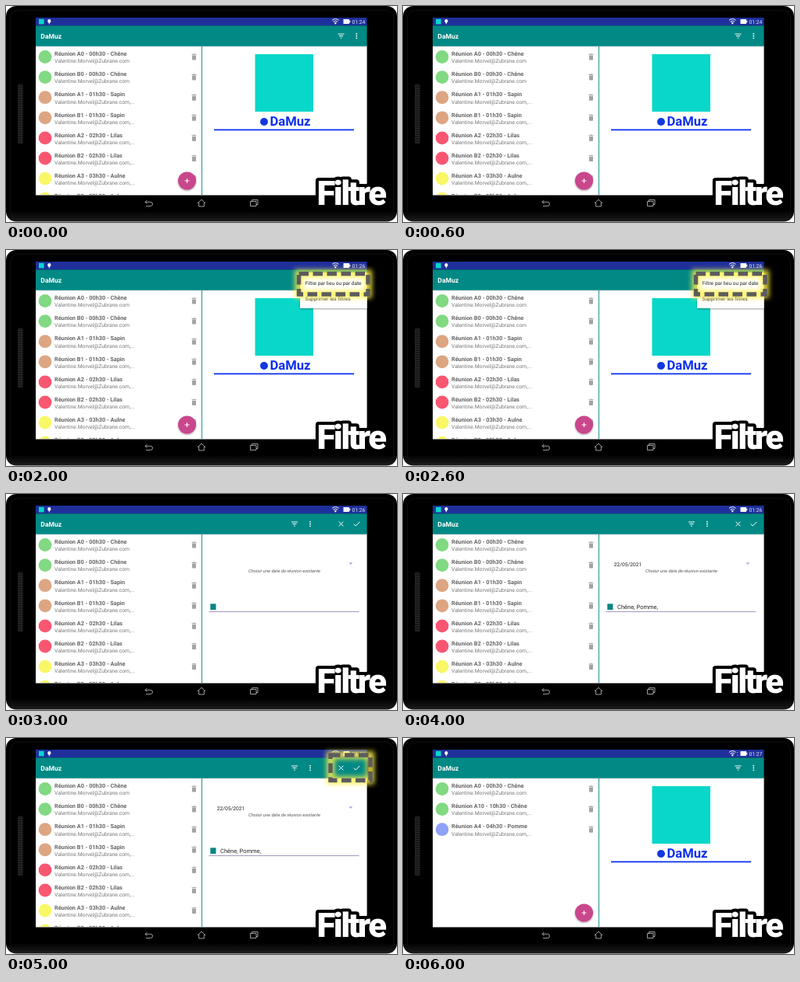
Write an HTML page that moves like this. It is 500 by 278 pixels and loops after 7 s.

```html
<!DOCTYPE html>
<html lang="fr">
<head>
<meta charset="utf-8">
<title>Filtre</title>
<style>
html, body { margin: 0; width: 100%; height: 100%; overflow: hidden; background: #fff; }
svg { display: block; width: 100vw; height: 100vh; }
text { font-family: Roboto, Arial, sans-serif; text-rendering: geometricPrecision; }
.bold { font-weight: 700; }
.line { fill: none; stroke: #fff; stroke-width: 1; }
.keys { fill: none; stroke: #c4c4c4; stroke-width: .8; }
.glow { fill: none; stroke: #fff04a; stroke-width: 10; opacity: .85; filter: url(#blur); }
.dash { fill: none; stroke: #5c5c5c; stroke-width: 5.5; stroke-dasharray: 12.5 5.5; }
.word {
  font: 900 43.5px "Roboto Condensed", Roboto, sans-serif;
  font-stretch: 75%; letter-spacing: -2.6px; text-anchor: middle; stroke-linejoin: round;
}

/* Hard cuts, one per second of the 7 s loop */
.home, .form, .menu, .pick, .filled, .apply, .all, .few, .t24, .t26 {
  animation: 7s step-end infinite;
}
.home { animation-name: home; }
.form { animation-name: form; }
.menu { animation-name: menu; }
.pick { animation-name: pick; }
.filled { animation-name: filled; }
.apply { animation-name: apply; }
.all { animation-name: all; }
.few { animation-name: few; }
.t24 { animation-name: t24; }
.t26 { animation-name: t26; }
@keyframes home { 0%, 85.7143% { visibility: visible } 42.8571% { visibility: hidden } }
@keyframes form { 0%, 85.7143% { visibility: hidden } 42.8571% { visibility: visible } }
@keyframes menu { 0%, 42.8571% { visibility: hidden } 14.2857% { visibility: visible } }
@keyframes pick { 0%, 42.8571% { visibility: hidden } 28.5714% { visibility: visible } }
@keyframes filled { 0%, 85.7143% { visibility: hidden } 57.1429% { visibility: visible } }
@keyframes apply { 0%, 85.7143% { visibility: hidden } 71.4286% { visibility: visible } }
@keyframes all { 0% { visibility: visible } 85.7143%, 100% { visibility: hidden } }
@keyframes few { 0% { visibility: hidden } 85.7143%, 100% { visibility: visible } }
@keyframes t24 { 0% { visibility: visible } 14.2857%, 100% { visibility: hidden } }
@keyframes t26 { 0%, 85.7143% { visibility: hidden } 14.2857% { visibility: visible } }
</style>
</head>
<body>
<svg viewBox="0 0 500 278" preserveAspectRatio="none">
  <defs>
    <clipPath id="content"><path d="M38 52H462V243H38z"/></clipPath>
    <filter id="blur" x="-30%" y="-60%" width="160%" height="220%"><feGaussianBlur stdDeviation="3"/></filter>
    <filter id="soft" x="-20%" y="-20%" width="140%" height="150%">
      <feDropShadow dx="0" dy="1" stdDeviation="1.3" flood-opacity=".38"/>
    </filter>
    <linearGradient id="shade" x2="0" y2="1">
      <stop stop-opacity=".15"/><stop offset="1" stop-opacity="0"/>
    </linearGradient>
    <linearGradient id="bevel" x2="0" y2="1">
      <stop offset=".95"/><stop offset="1" stop-color="#1e1e1e"/>
    </linearGradient>
    <pattern id="mesh" width="3" height="3" patternUnits="userSpaceOnUse">
      <circle cx="1.5" cy="1.5" r=".8" fill="#3a3a3a"/>
    </pattern>
    <g id="bin" fill="#a3a3a3"><path d="M-2.5-2H2.5V3.2Q2.5 4 1.7 4H-1.7Q-2.5 4-2.5 3.2zM-3-3.7H-1.3L-.8-4.3H.8L1.3-3.7H3V-2.7H-3z"/></g>
    <g id="filter"><path class="line" d="M-4-2.5H4M-2.6 0H2.6M-1 2.5H1"/></g>
    <g id="dots" fill="#fff"><circle cy="-2.8" r=".9"/><circle r=".9"/><circle cy="2.8" r=".9"/></g>
  </defs>

  <!-- Tablet -->
  <rect width="500" height="277.5" rx="13" fill="url(#bevel)"/>
  <rect x="5.5" y="5.5" width="490" height="267" rx="10" fill="none" stroke="#101010"/>
  <rect x="15" y="100.5" width="7" height="77" rx="2.5" fill="#161616"/>
  <rect x="15" y="100.5" width="7" height="77" rx="2.5" fill="url(#mesh)"/>

  <!-- Screen -->
  <path fill="#fff" d="M38 51H461.6V243.4H38z"/>
  <path fill="#1f309c" d="M38 15H461.6V25.300H38z"/>
  <path fill="#008985" d="M38 25.300H461.6V51.7H38z"/>
  <text class="bold" x="44.3" y="41.8" font-size="8.6" fill="#fff">DaMuz</text>

  <!-- Status bar -->
  <path fill="#08d7c9" d="M42 16.800H48.600V23.400H42z"/>
  <g fill="#fff">
    <path d="M55.300 17a2.300 2.300 0 0 1 .8 4.400L55.300 24L54.500 21.400A2.300 2.300 0 0 1 55.300 17z"/>
    <path d="M421.300 23.700L419.700 21.700Q421.300 20.500 422.900 21.700z"/>
    <path d="M431.500 17H439V18.700H440.300V21.300H439V23H431.500z"/>
    <path class="few" d="M427.500 18H428.300V19H427.500zM427.500 21.500H428.300V22.500H427.500z"/>
  </g>
  <path class="line" d="M417 18.400Q421.300 14.800 425.600 18.400M418.500 20.300Q421.300 18 424.100 20.300"/>
  <g font-size="6.8" fill="#dfe3f8">
    <text class="t24" x="442.5" y="22.6">01:24</text>
    <text class="t26" x="442.5" y="22.6">01:26</text>
    <text class="few" x="442.5" y="22.6">01:27</text>
  </g>

  <!-- List -->
  <g clip-path="url(#content)">
    <g class="all" id="all"></g>
    <g class="few" id="few"></g>
  </g>
  <path stroke="#23949a" d="M250.500 51.700V243"/>
  <path fill="url(#shade)" d="M38 51.700H461.600V53.700H38z"/>

  <g class="home">
    <use href="#filter" x="428.5" y="38.5"/>
    <use href="#dots" x="448.3" y="38.5"/>
    <circle cx="231.5" cy="225" r="11.5" fill="#c9468c" filter="url(#soft)"/>
    <path class="line" d="M228.500 225H234.500M231.500 222V228"/>
    <path fill="#08d7c9" d="M318.500 62H393V136H318.500z"/>
    <circle cx="330" cy="149" r="5" fill="#1238e0"/>
    <text class="bold" x="337.5" y="154" font-size="16.6" fill="#0a2ef0">DaMuz</text>
    <path stroke="#0a2ef0" stroke-width="1.8" d="M266 159.300H445"/>
  </g>

  <g class="form">
    <use href="#filter" x="369" y="38.5"/>
    <use href="#dots" x="389" y="38.5"/>
    <path class="line" d="M425.600 35.600L431.400 41.400M431.400 35.600L425.600 41.400M444.700 38.600L447.200 41.100L452.300 35.900"/>
    <path fill="#a3abd6" d="M438.500 88.300H443.300L440.900 90.900z"/>
    <text x="356" y="101" font-size="5.75" font-style="italic" text-anchor="middle" fill="#555">Choisir une date de réunion existante</text>
    <path fill="#0b8582" d="M261.300 141.300H268.500V149H261.300z"/>
    <path stroke="#a698c2" d="M259.500 151.500H451.500"/>
  </g>
  <g class="filled" fill="#222">
    <text x="269.7" y="92.5" font-size="6.7">22/05/2021</text>
    <text x="274" y="148" font-size="7.5">Chêne, Pomme,</text>
  </g>

  <g class="menu">
    <path fill="#fff" filter="url(#soft)" d="M376 29H461.500V75H376z"/>
    <g font-size="6.55" fill="#222">
      <text x="382.5" y="44.8">Filtre par lieu ou par date</text>
      <text x="382.5" y="64.5">Supprimer les filtres</text>
    </g>
  </g>
  <g class="pick">
    <rect class="glow" x="374.5" y="30.5" width="88.5" height="26.5"/>
    <rect class="dash" x="374.5" y="30.5" width="88.5" height="26.5"/>
  </g>
  <g class="apply">
    <rect class="glow" x="415" y="22" width="51" height="32.5"/>
    <rect class="dash" x="415" y="22" width="51" height="32.5"/>
  </g>

  <!-- Navigation keys -->
  <g class="keys">
    <path d="M180.500 249.800L178 252.300L180.500 254.800M178 252.300H184.500Q187.500 252.300 187.500 255Q187.500 257.500 184.500 257.500H179"/>
    <path d="M245 254L250 249L255 254M246.700 253V258H253.300V253"/>
    <path d="M312.500 251.500H320V257.500H312.500zM314.500 251.500V249.500H322V255.500H320"/>
  </g>

  <g class="word">
    <text x="441" y="255.5" fill="#000" stroke="#000" stroke-width="8">Filtre</text>
    <text x="441" y="255.5" fill="#fff">Filtre</text>
  </g>
</svg>
<script>
const green = '#81d982', tan = '#dda682', red = '#fb5671', yellow = '#f9f765', blue = '#90a2f8';

const row = ([code, hour, room, color], i) => `
  <g transform="translate(0 ${65.5 + i * 26.1})">
    <circle cx="50" r="8.4" fill="${color}"/>
    <text class="bold" x="62" y="-1.3" font-size="7.3" fill="#666">Réunion ${code} - ${hour}h30 - ${room}</text>
    <text x="62" y="7.9" font-size="6.75" fill="#777">Valentine.Morvel@Zubrane.com${/^.0$/.test(code) ? '' : ',...'}</text>
    <use href="#bin" x="240.5"/>
  </g>`;

const fill = (id, rows) => document.getElementById(id).innerHTML = rows.map(row).join('');

const rooms = [['Chêne', green], ['Sapin', tan], ['Lilas', red], ['Aulne', yellow]];
fill('all', rooms.flatMap(([room, color], n) =>
  ['A', 'B'].map(s => [s + n, '0' + n, room, color])));
fill('few', [
  ['A0', '00', 'Chêne', green],
  ['A10', '10', 'Chêne', green],
  ['A4', '04', 'Pomme', blue]
]);
</script>
</body>
</html>
```
